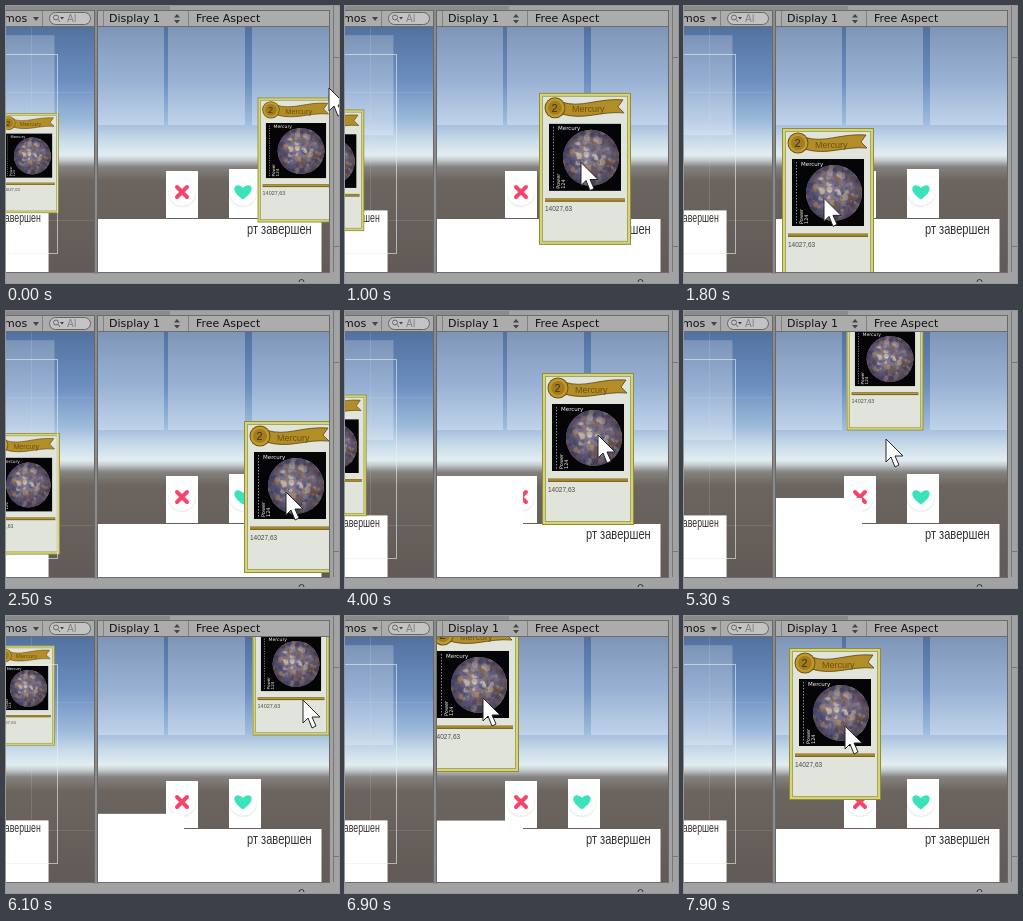
Recreate the animation shown at these times as an HTML page with a canvas. Size 333 by 277 pixels, loop 8000 ms.

```html
<!DOCTYPE html>
<html lang="ru">
<head>
<meta charset="utf-8">
<style>
html, body { margin: 0; width: 100%; height: 100%; overflow: hidden; background: #a2a2a2; }
canvas { display: block; }
</style>
</head>
<body>
<canvas id="stage" width="333" height="277"></canvas>
<script>
const ctx = document.getElementById('stage').getContext('2d');
const LOOP = 8000, STEP = 100;
const UI = '"DejaVu Sans", sans-serif';
const SANS = '"Liberation Sans", Arial, sans-serif';

// Card centre over time; it stays put and shrinks while released
const cardPath = [
  [0, 290, 154], [300, 290, 157], [900, 256, 157], [1600, 144, 198], [1800, 144, 198],
  [2500, 284, 186], [2900, 287, 182], [3600, 282, 168], [4000, 243, 138], [4200, 188, 145],
  [4600, 150, 155], [5000, 185, 75], [5200, 201, 57], [5600, 203, 68], [5900, 280, 62],
  [6000, 285, 57], [6300, 283, 66], [6900, 128, 80], [7000, 119, 57], [7500, 126, 110],
  [7700, 122, 140], [7900, 151, 108]
];
const released = [[0, 300], [2900, 3600], [5200, 5600], [6000, 6300], [7000, 7500]];

// Pointer relative to the card centre
const grip = [
  [0, 33, -72], [300, -4, -7], [2500, -4, -5], [3300, 1, -8], [3500, 21, -14],
  [3600, 10, -14], [4600, 10, -14], [5300, 1, 71], [5600, 5, 18], [6000, 4, 17],
  [6100, 12, 27], [6300, 10, 2], [6900, 10, 2], [7200, 32, 40], [7500, 10, 2]
];

// Top edge of the sliding white panel
const slide = [[3100, 118], [3200, 127], [3300, 127], [4000, 165], [5300, 187], [6000, 197], [7900, 213]];

function at(keys, t) {
  let i = 0;
  while (i < keys.length - 1 && keys[i + 1][0] <= t) i++;
  const a = keys[i], b = keys[i + 1] || a;
  const k = b === a ? 0 : (t - a[0]) / (b[0] - a[0]);
  return a.map((v, n) => v + (b[n] - v) * k);
}

function stateAt(t) {
  const rest = released.find(r => t >= r[0] && t < r[1]);
  const [, x, y] = at(cardPath, rest ? rest[0] : t);
  const [, dx, dy] = at(grip, t);
  const top = t < slide[0][0] ? 213 : at(slide, t)[1];
  return { x, y, big: !rest, px: x + dx, py: y + dy, top };
}

function rect(x, y, w, h, color) {
  ctx.fillStyle = color;
  ctx.fillRect(x, y, w, h);
}

function text(s, x, y, font, color) {
  ctx.font = font;
  ctx.fillStyle = color;
  ctx.fillText(s, x, y);
}

function poly(points, color) {
  ctx.beginPath();
  points.forEach(p => ctx.lineTo(p[0], p[1]));
  ctx.closePath();
  ctx.fillStyle = color;
  ctx.fill();
}

// Small triangle; a negative height points up
function arrow(x, y, w, h) {
  poly([[x, y], [x + w, y], [x + w / 2, y + h]], '#444');
}

function disc(x, y, r, fill) {
  ctx.beginPath();
  ctx.arc(x, y, r, 0, Math.PI * 2);
  ctx.fillStyle = fill;
  ctx.fill();
}

function clipped(x, y, w, h, draw) {
  ctx.save();
  ctx.beginPath();
  ctx.rect(x, y, w, h);
  ctx.clip();
  draw();
  ctx.restore();
}

function gradient(y0, y1, stops) {
  const g = ctx.createLinearGradient(0, y0, 0, y1);
  stops.forEach(s => g.addColorStop((s[0] - y0) / (y1 - y0), s[1]));
  return g;
}

const skyFill = gradient(21, 266, [
  [21, '#52719f'], [75, '#6c8fc0'], [115, '#9dbadb'], [135, '#c9dcea'], [149, '#e2edf1'],
  [154, '#c5cccf'], [161, '#85827f'], [175, '#6b645f'], [266, '#625a56']
]);
const slotFill = gradient(-6, 119, [[-6, 'rgba(255,255,255,.22)'], [119, 'rgba(235,240,250,.4)']]);

function rng(seed) {
  return () => (seed = (seed * 16807) % 2147483647) / 2147483647;
}

function makeSpots() {
  const rnd = rng(77), tints = ['#c49a62', '#6f6f9c', '#4d5a8c', '#d9cbb4', '#8d6748', '#9aa3c0', '#59506f'];
  return Array.from({ length: 240 }, () => {
    const a = rnd() * 7, d = Math.sqrt(rnd()) * 28;
    return [Math.cos(a) * d, Math.sin(a) * d, 0.6 + rnd() * 2.6, tints[Math.floor(rnd() * tints.length)]];
  });
}
const spots = makeSpots();

function planet(x, y, r) {
  ctx.save();
  ctx.translate(x, y);
  disc(0, 0, r, '#85788a');
  ctx.clip();
  ctx.globalAlpha = 0.6;
  spots.forEach(s => disc(...s));
  ctx.globalAlpha = 1;
  const g = ctx.createRadialGradient(-5, -5, 8, 0, 0, r);
  g.addColorStop(0, 'rgba(30,20,40,0)');
  g.addColorStop(1, 'rgba(20,15,45,.5)');
  disc(0, 0, r, g);
  ctx.restore();
}

function ribbon() {
  ctx.beginPath();
  ctx.moveTo(22, 9);
  ctx.bezierCurveTo(42, 16, 58, 5, 84, 7);
  ctx.lineTo(79, 14);
  ctx.lineTo(85, 20);
  ctx.bezierCurveTo(60, 18, 46, 28, 22, 21);
  ctx.closePath();
  ctx.fillStyle = '#b38d27';
  ctx.fill();
  ctx.strokeStyle = '#594411';
  ctx.lineWidth = 0.8;
  ctx.stroke();
  disc(16, 15, 10.5, '#6f5512');
  disc(16, 15, 9.5, '#c09a2c');
  disc(16, 15, 7, '#a17d20');
  text('2', 12.6, 19, '11px ' + SANS, '#3f300c');
  text('Mercury', 33, 19.5, '9px ' + SANS, '#6b5113');
}

// Card face in a 92 x 152 box
function card(cx, cy, big) {
  ctx.save();
  ctx.translate(cx, cy);
  if (!big) ctx.scale(0.835, 0.822);
  ctx.translate(-46, -76);
  const edges = ['#8f8e31', '#d5d37b', '#d5d37b', '#a6a75c', '#e1e4db'];
  edges.forEach((c, i) => rect(i, i, 92 - 2 * i, 152 - 2 * i, c));
  ribbon();
  rect(10, 31, 72, 67, '#050507');
  planet(52, 65, 28);
  text('Mercury', 19, 37.5, '5.5px ' + UI, '#f4f4f4');
  for (let y = 34; y < 95; y += 3) rect(14, y, 0.8, 1.5, '#aaa');
  ctx.save();
  ctx.translate(21, 96);
  ctx.rotate(-Math.PI / 2);
  text('Power', 0, 0, '5px ' + UI, '#eee');
  text('124', 0, 5, '5px ' + UI, '#eee');
  ctx.restore();
  rect(6, 105.5, 80, 3.5, '#7d6820');
  rect(6, 106.3, 80, 1.3, '#b7982f');
  text('14027,63', 6, 118.5, '6.5px ' + SANS, '#4a4a48');
  ctx.restore();
}

function choice(x, y, cx) {
  rect(x, y, 32, 212 - y, '#fdfefe');
  disc(cx, 187.3, 14, '#edf0f1');
  disc(cx, 186, 13.5, '#fff');
}

function cross() {
  choice(160, 165, 176);
  ctx.strokeStyle = '#f5466a';
  ctx.lineWidth = 4;
  ctx.lineCap = 'round';
  ctx.beginPath();
  for (const d of [-5, 5]) {
    ctx.moveTo(176 - d, 181);
    ctx.lineTo(176 + d, 191);
  }
  ctx.stroke();
}

function heart() {
  choice(223, 163, 237);
  ctx.beginPath();
  ctx.moveTo(237, 193.5);
  ctx.bezierCurveTo(221, 183, 231, 175, 237, 182);
  ctx.bezierCurveTo(243, 175, 253, 183, 237, 193.5);
  ctx.fillStyle = '#3be3ba';
  ctx.fill();
}

function caption() {
  ctx.save();
  ctx.translate(241, 228);
  ctx.scale(0.74, 1);
  text('рт завершен', 0, 0, '15px ' + SANS, '#323232');
  ctx.restore();
}

function world(s) {
  [81, 162, 246].forEach(x => rect(x, -6, 77, 125, slotFill));
  cross();
  heart();
  rect(20, 213, 295.5, 90, '#fff');
  rect(0, s.top, 178, 303 - s.top, '#fff');
  caption();
  card(s.x, s.y, s.big);
}

function sceneView(s) {
  rect(0, 21, 88, 245, skyFill);
  rect(25, 21, 1, 245, 'rgba(220,220,220,.16)');
  for (let y = 86; y < 266; y += 64) rect(0, y, 88, 1, 'rgba(220,220,220,.13)');
  ctx.save();
  ctx.translate(-206.7, 34);
  ctx.scale(0.79, 0.8);
  world(s);
  ctx.restore();
  ctx.strokeStyle = 'rgba(235,240,245,.6)';
  ctx.lineWidth = 1;
  ctx.strokeRect(-9.5, 48.5, 61, 199);
}

function gameView(s) {
  rect(92, 21, 231, 245, skyFill);
  world(s);
}

function searchBox() {
  ctx.beginPath();
  ctx.roundRect(43.5, 6.5, 41, 12, 6);
  ctx.fillStyle = '#c3c3c3';
  ctx.fill();
  ctx.lineWidth = 1;
  ctx.lineCap = 'butt';
  ctx.strokeStyle = '#666';
  ctx.stroke();
  ctx.beginPath();
  ctx.arc(50, 11.5, 2.5, 0, 7);
  ctx.moveTo(52, 13.5);
  ctx.lineTo(54, 16);
  ctx.stroke();
  arrow(54, 11, 4, 2.5);
  text('Al', 61, 16, '10px ' + UI, '#808080');
}

function chrome() {
  rect(0, 0, 333, 277, '#a2a2a2');
  rect(0, 0, 164, 4, '#8b8b8b');
  rect(0, 4, 324, 17, '#acacac');
  [4, 20, 266].forEach(y => rect(0, y, 324, 1, '#6c6c6c'));
  rect(88, 4, 4, 264, '#8b8b8b');
  [88, 91, 323].forEach(x => rect(x, 4, 1, 263, '#686868'));
  rect(327, 0, 1, 266, '#777');
  [51, 240].forEach(y => rect(328, y, 5, 1, '#777'));
  [36, 97, 182].forEach(x => rect(x, 5, 1, 15, '#818181'));
  const label = (s, x) => text(s, x, 16, '11px ' + UI, '#111');
  label('mos', -2);
  label('Display 1', 103);
  label('Free Aspect', 190);
  arrow(27, 11, 6, 4);
  arrow(168, 11.5, 6, -3.5);
  arrow(168, 14, 6, 3.5);
  searchBox();
  ctx.beginPath();
  ctx.arc(295.5, 276, 2.5, Math.PI, 0);
  ctx.strokeStyle = '#333';
  ctx.stroke();
}

function pointer(x, y) {
  ctx.save();
  ctx.translate(x, y);
  poly([[0, 0], [0, 23], [5, 18], [9, 28], [13, 26], [9, 17], [17, 17]], '#fff');
  ctx.strokeStyle = '#272727';
  ctx.lineWidth = 1;
  ctx.lineJoin = 'round';
  ctx.stroke();
  ctx.restore();
}

function draw(t) {
  const s = stateAt(t);
  chrome();
  clipped(0, 21, 88, 245, () => sceneView(s));
  clipped(92, 21, 231, 245, () => gameView(s));
  pointer(s.px, s.py);
}

let start;
function tick(now) {
  if (start === undefined) start = now;
  draw(Math.floor(((now - start) % LOOP) / STEP) * STEP);
  requestAnimationFrame(tick);
}
draw(0);
requestAnimationFrame(tick);
</script>
</body>
</html>
```
